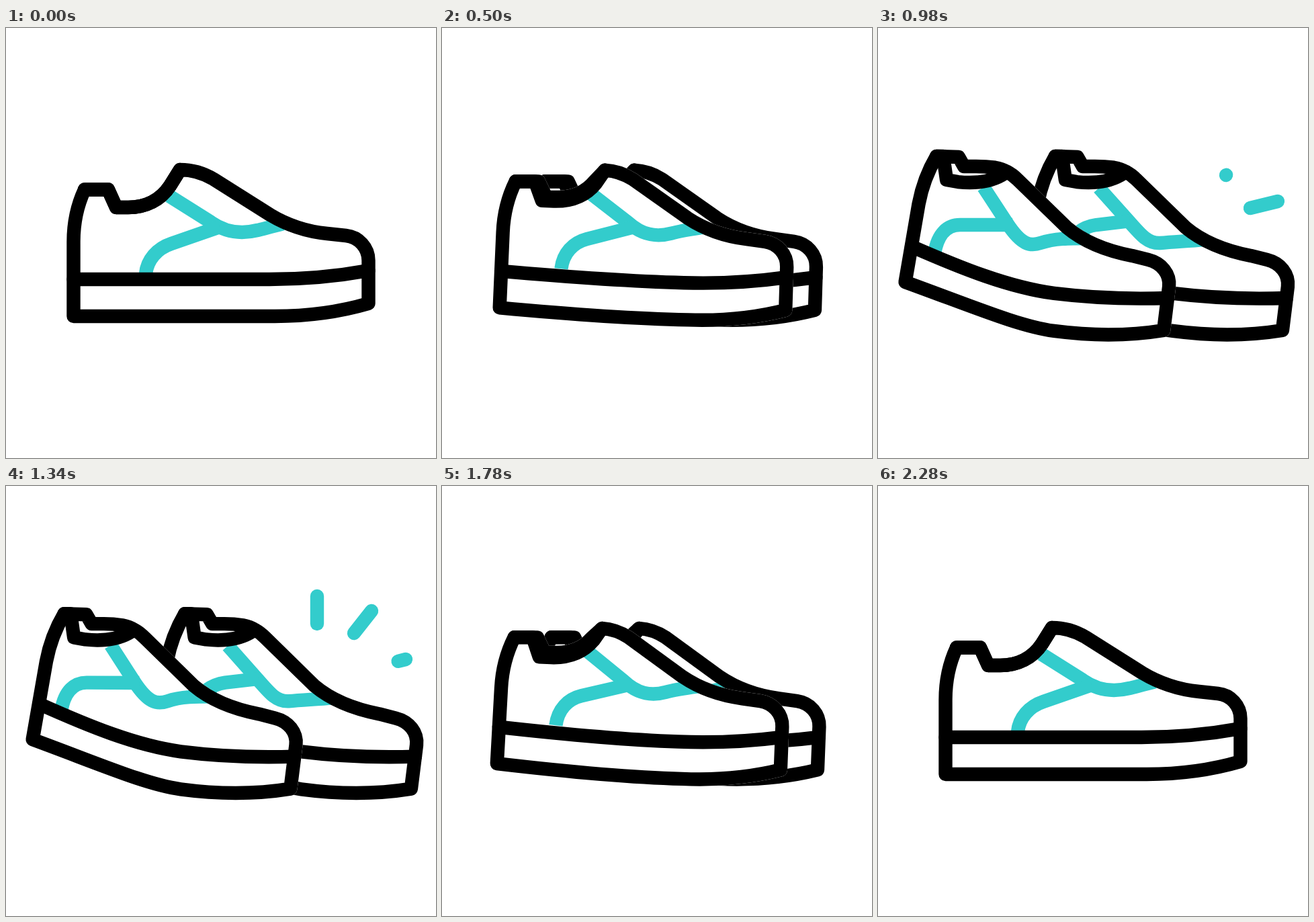
Write an HTML page with a canvas that moves like this. It is 640 px wide and 640 px high and loops after 2.4 s.

```html
<!DOCTYPE html>
<html lang="en">
<head>
<meta charset="utf-8">
<title>Sneakers</title>
<style>
  html, body { margin: 0; width: 100%; height: 100%; overflow: hidden; background: #fff; }
  canvas { display: block; width: 640px; height: 640px; }
</style>
</head>
<body>
<canvas id="stage" width="640" height="640"></canvas>
<script>
const ctx = document.getElementById('stage').getContext('2d');
const LOOP = 2400, BLACK = '#000', TEAL = '#33cccc', WEIGHT = 20.4, SPREAD = 177;

// Each part: [side view, turned view]; both share the same commands.
const shell = [
  `M100.5 429 L100.5 318 C100.5 290 106 264 117 240.5 L152 240.5 L164 267 L182 267
   C208 267 230 256 244 235 C249 227 254 219 259 211 C277 211 294 216 309 225 L393 278
   C418 293 447 303 478 306 L506 309 C525 311 539.5 327 539.5 346 L539.5 410
   C495 423 447 429 400 429 C300 429 200 429 100.5 429 Z`,
  `M40.5 378 L60.5 262 C65 238 74 213 87 191 L120 192 L128 206 L146 206
   C155 206 165 206.5 174 207.7 C181 209 187 211 192 214 C198 217 203 221 208 226 L281 297
   C306 318 342 332 378 339 L402 345 C422 350 435 366 433 385 L425 450
   C370 459 315 458 262 451 C210 444 145 416 40.5 378 Z`
];
const collar = [
  'M117 240.5 L152 240.5 L164 267 L182 267 C208 267 230 256 244 235 L259 211',
  'M87 191 L97 191 L102 226 L119 229 C147 232 168 228 184 219 L192 214'
];
const sole = [
  'M100.5 374 C200 374 300 374 392 374 C440 374 490 370 539.5 361',
  'M50 325 C125 358 195 386 262 395 C310 401 370 404 431 402'
];
const strap = 'M243 250 L305 289 C325 303 348 307.5 374 301 C386 298 399 295 412 291.5';
const side = 'M208 366 C210 345 225 328 246 321 L318 296';
const frontTrim = [
  [strap, 'M157 237 L193 292 C213 322 226 325.5 242 320 C262 313 285 313 315 313'],
  [side, 'M84 335 C89 305 104 293 122 293 L200 293']
];
const rearTrim = [
  [strap, 'M152 238 L195 286 C215 309 225 321 243 320 C265 318 287 317 308 315'],
  [side, 'M108 325 C110 308 128 296 148 293 L198 287']
];

// Rays: x1, y1, x2, y2, grow start, shrink start.
const rays = [
  [554, 268, 595, 258, 840, 1240],
  [518, 219, 544, 186, 980, 1365],
  [463, 205, 463, 164, 1110, 1485]
];
const RAY_TIME = 140;

const clamp = x => Math.min(1, Math.max(0, x));

// cubic-bezier(.75, 0, .25, 1)
function ease(x) {
  let lo = 0, hi = 1;
  for (let i = 0; i < 24; i++) {
    const s = (lo + hi) / 2, r = 1 - s;
    if (2.25 * s * r * r + 0.75 * s * s * r + s * s * s < x) lo = s; else hi = s;
  }
  return lo * lo * (3 - 2 * lo);
}

function morph([from, to], k) {
  const ends = to.match(/[\d.]+/g);
  let i = 0;
  return new Path2D(from.replace(/[\d.]+/g, n => (+n + (ends[i++] - n) * k).toFixed(3)));
}

function stroke(path, color, cap = 'round') {
  ctx.strokeStyle = color;
  ctx.lineCap = cap;
  ctx.stroke(path);
}

function shoe(k, dx, trim) {
  ctx.save();
  ctx.translate(dx, 0);
  const body = morph(shell, k);
  ctx.fillStyle = '#fff';
  ctx.fill(body);
  stroke(body, '#fff');
  for (const part of trim) stroke(morph(part, k), TEAL, 'butt');
  for (const path of [body, morph(collar, k), morph(sole, k)]) stroke(path, BLACK);
  ctx.restore();
}

function ray([x1, y1, x2, y2, grow, shrink], t) {
  const head = clamp((t - grow) / RAY_TIME), tail = clamp((t - shrink) / RAY_TIME);
  if (head <= 0 || tail >= 1) return;
  const dx = x2 - x1, dy = y2 - y1;
  const line = new Path2D();
  line.moveTo(x1 + dx * tail, y1 + dy * tail);
  line.lineTo(x1 + dx * head, y1 + dy * head);
  stroke(line, TEAL);
}

function draw(t) {
  const turn = ease(clamp(t / 1200)) - ease(clamp((t - 1218) / 1012));
  const k = turn * 1.025;
  ctx.fillStyle = '#fff';
  ctx.fillRect(0, 0, 640, 640);
  ctx.lineWidth = WEIGHT;
  ctx.lineJoin = 'round';
  if (k > 0.0005) shoe(k, SPREAD * k, rearTrim);
  shoe(k, 0, frontTrim);
  for (const r of rays) ray(r, t);
}

const start = performance.now();
function tick() {
  draw((performance.now() - start) % LOOP);
  requestAnimationFrame(tick);
}
tick();
</script>
</body>
</html>
```
